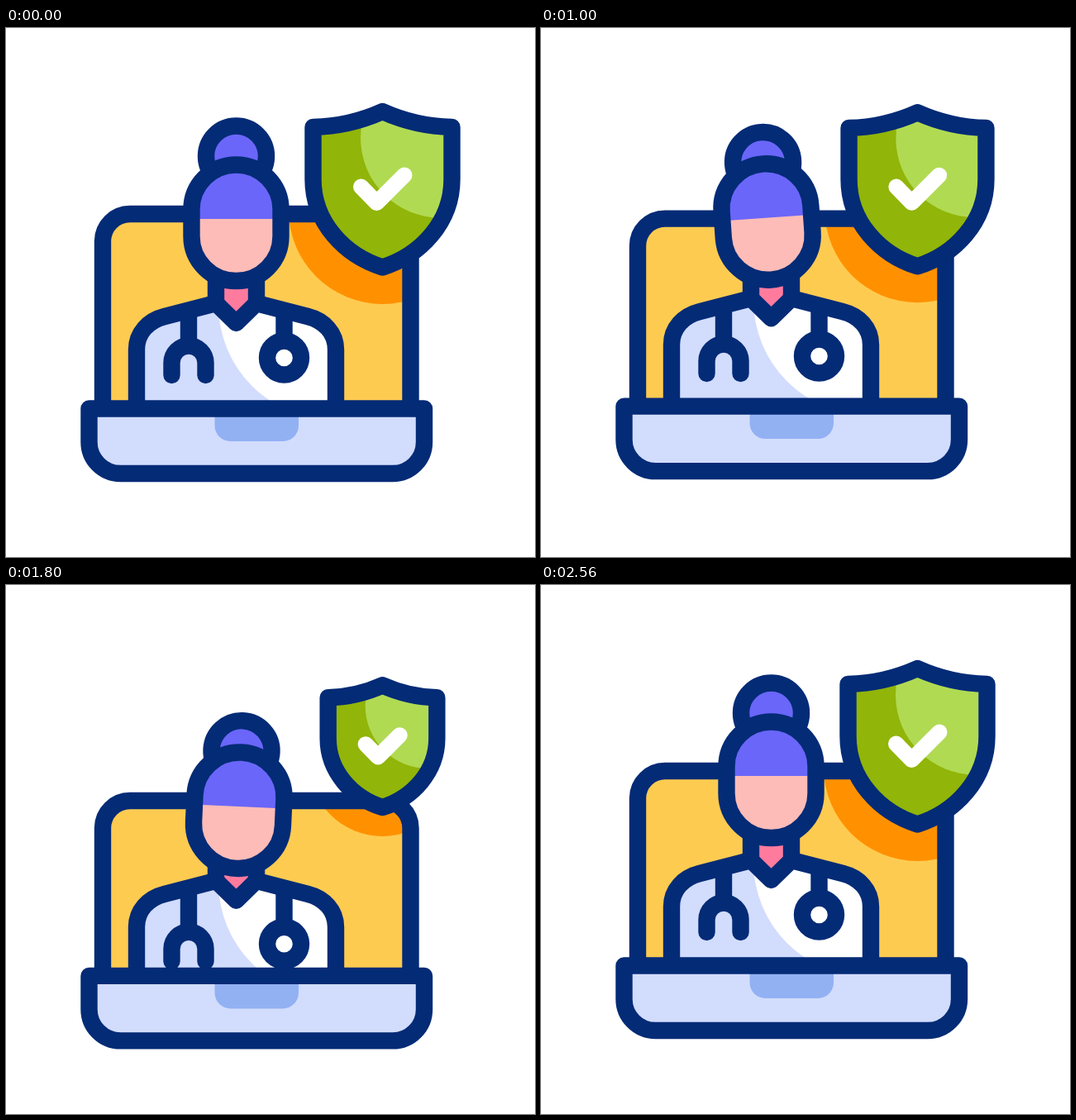
Recreate the animation shown at these times as an HTML page with a canvas. Size 640x640 px, loop 3000 ms.

```html
<!DOCTYPE html>
<html lang="en">
<head>
<meta charset="utf-8">
<title>Online doctor</title>
<style>
  html, body { margin: 0; width: 100%; height: 100%; overflow: hidden; background: #fff; }
  canvas { display: block; }
</style>
</head>
<body>
<canvas id="stage" width="640" height="640"></canvas>
<script>
const ctx = document.getElementById('stage').getContext('2d');
const LOOP = 3000, STEP = 40;
const NAVY = '#042b76', LAVENDER = '#d2dcfd', PURPLE = '#6a66f9';

// Smoothly eased value between [time, value] keys
function track(t, keys) {
  if (t <= keys[0][0]) return keys[0][1];
  for (let i = 1; i < keys.length; i++) {
    const [t0, a] = keys[i - 1], [t1, b] = keys[i];
    if (t < t1) {
      const u = (t - t0) / (t1 - t0);
      return a + (b - a) * u * u * (3 - 2 * u);
    }
  }
  return keys[keys.length - 1][1];
}

// Down, up, down and back to rest, in equal beats
const bounce = (t, start, last) =>
  track(t, [0, 1, -1, last, 0].map((v, i) => [start + 520 * i, v]));

const circlePath = (x, y, r) => {
  const p = new Path2D();
  p.arc(x, y, r, 0, 7);
  return p;
};

const screen = new Path2D('M117 490 V258 A33 33 0 0 1 150 225 H456.5 A33 33 0 0 1 489.5 258 V490');
const base = new Path2D('M100.5 460.5 H506 V501 A38 38 0 0 1 468 539 H138.5 A38 38 0 0 1 100.5 501 Z');
const notch = new Path2D('M252.5 462 H354 V481 A19 19 0 0 1 335 500 H271.5 A19 19 0 0 1 252.5 481 Z');
const torso = new Path2D('M158 500 V389 C158 369 172 354 192 349 L254 333 L278.5 357 L303 333 L365 349 C385 354 399 369 399 389 V500');
const torsoLight = circlePath(396, 335, 139);
const neck = new Path2D('M254 333 V290 H303 V333 L278.5 357 Z');
const head = new Path2D();
head.roundRect(224.5, 165.5, 108, 140.5, 54);
const shield = new Path2D('M-84 -75 Q-40 -76 0 -94 Q40 -76 84 -75 V-12 C84 40 46 80 0 94.5 C-46 80 -84 40 -84 -12 Z');
const shieldLight = circlePath(70, -62, 96.5);
const shieldGlow = circlePath(0, 25.5, 113.5);
const check = new Path2D('M-26 -3 L-7 16.5 L26.5 -17');

function fill(path, color) {
  ctx.fillStyle = color;
  ctx.fill(path);
}

function stroke(path, color = NAVY) {
  ctx.strokeStyle = color;
  ctx.stroke(path);
}

function layer(paint, clip) {
  ctx.save();
  if (clip) ctx.clip(clip);
  paint();
  ctx.restore();
}

function moved(path, x, y, scale = 1) {
  const p = new Path2D();
  p.addPath(path, new DOMMatrix([scale, 0, 0, scale, x, y]));
  return p;
}

function drawStethoscope(dy) {
  const y = 399 + dy;
  stroke(new Path2D(`M221 344 V${y - 15} M336.5 344 V${y - 22}`));
  stroke(new Path2D(`M200.5 ${y + 21} V${y + 6} a20.5 20.5 0 0 1 41 0 V${y + 21}`));
  const disc = circlePath(336.5, y, 20.5);
  fill(disc, '#fff');
  stroke(disc);
}

function drawHead(dy, angle, bunDy) {
  ctx.translate(278.5, 307 + dy);
  ctx.rotate(angle * Math.PI / 180);
  ctx.translate(-278.5, -307);
  const bun = circlePath(278.5, 155 + bunDy, 36.5);
  fill(bun, PURPLE);
  stroke(bun);
  fill(head, '#fdbcb7');
  layer(() => {
    ctx.fillStyle = PURPLE;
    ctx.fillRect(220, 160, 120, 71);
  }, head);
  stroke(head);
}

function draw(t) {
  const baseDy = 25.2 * bounce(t, 200, 0.5);
  const follow = bounce(t, 280, 0.98);
  const bunDy = 11.8 * bounce(t, 360, 1);
  const tilt = track(t, [[280, 0], [800, -7.4], [1440, 7.4], [2040, 0]]);
  const scale = track(t, [[200, 1], [680, 0.78], [1240, 1.122], [1760, 0.78], [2280, 1]]);
  const onShield = path => moved(path, 455.5, 195, scale);

  ctx.clearRect(0, 0, 640, 640);
  ctx.lineWidth = 20.4;
  ctx.lineCap = ctx.lineJoin = 'round';

  const panel = moved(screen, 0, baseDy + 25 * follow);
  fill(panel, '#fecb51');
  layer(() => fill(onShield(shieldGlow), '#ff9100'), panel);
  stroke(panel);

  layer(() => {
    ctx.translate(0, 2 * baseDy);
    fill(neck, '#ff7b9e');
    stroke(new Path2D('M254 290 V333 M303 290 V333'));
    fill(torso, LAVENDER);
    layer(() => fill(torsoLight, '#fff'), torso);
    drawStethoscope(11 * follow);
    stroke(torso);
    drawHead(12.8 * follow, tilt, bunDy);
  });

  layer(() => {
    ctx.translate(0, baseDy);
    fill(base, LAVENDER);
    fill(notch, '#92b1f3');
    stroke(base);
  });

  const body = onShield(shield);
  fill(body, '#91b508');
  layer(() => fill(onShield(shieldLight), '#b1da53'), body);
  stroke(body);
  ctx.lineWidth = 19;
  stroke(onShield(check), '#fff');
}

function tick() {
  const t = performance.now() % LOOP;
  draw(Math.floor(t / STEP) * STEP);
  requestAnimationFrame(tick);
}
tick();
</script>
</body>
</html>
```
